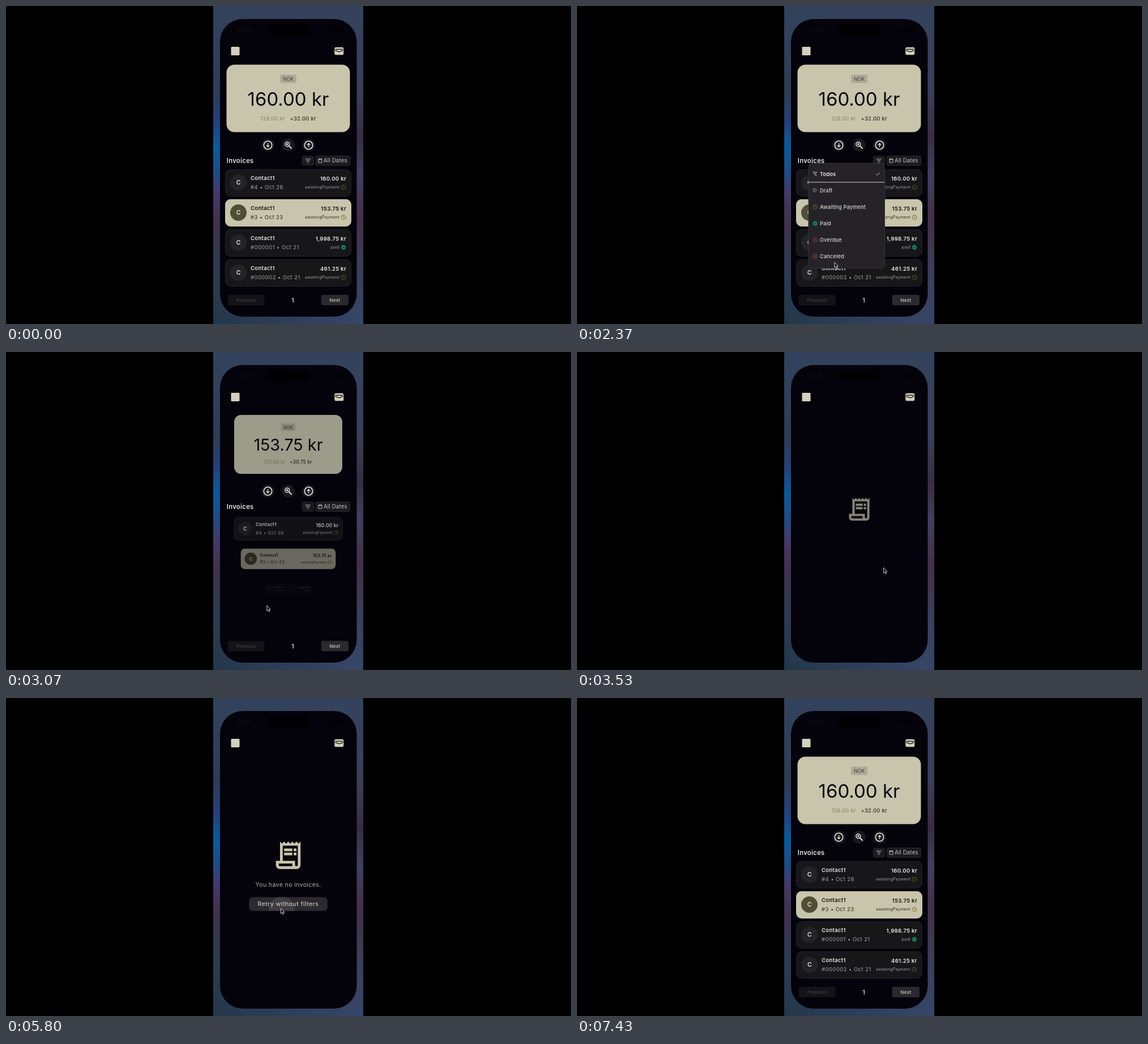
An HTML page for the animation above (7.83 s loop, 998 px wide and 561 px high).

```html
<!DOCTYPE html>
<html lang="en">
<head>
<meta charset="utf-8">
<title>Invoices</title>
<style>
  html, body { margin: 0; width: 100%; height: 100%; overflow: hidden; background: #000; }
  .wall { position: absolute; left: 366px; top: 0; width: 265px; height: 561px; }
  .left { background: linear-gradient(#34435d 0, #2d3d55 150px, #27407a 200px, #0a5c9c 250px, #1f4c86 295px,
    #453a6a 330px, #42324f 380px, #2f3b52 455px, #23384a 561px); }
  .right { background: linear-gradient(#34435d 0, #3d3f5a 150px, #3a2d40 230px, #42405f 295px, #44304a 375px,
    #3d3e59 455px, #37476a 561px); mask-image: linear-gradient(90deg, transparent, #000); }
  svg { position: absolute; left: 0; top: 0; width: 998px; height: 561px; }
  text { font-family: Inter, "Open Sans", sans-serif; white-space: pre; }
  .line { fill: none; stroke-linecap: round; stroke-linejoin: round; }
</style>
</head>
<body>
<div class="wall left"></div>
<div class="wall right"></div>
<svg id="stage" viewBox="0 0 998 561"></svg>
<script>
const LOOP = 7830, CX = 498.5;
const CREAM = '#c8c5ac', LIGHT = '#e9e8e4', PANEL = '#1b1a1f', EDGE = '#2a292e';

const text = (x, y, s, size, fill, { w = 400, ls = .3, at = 'start', id = '' } = {}) =>
  `<text ${id && `id="${id}"`} x="${x}" y="${y}" font-size="${size}" font-weight="${w}" fill="${fill}"
    letter-spacing="${ls}" text-anchor="${at}">${s}</text>`;
const box = (x, y, w, h, r, fill, stroke = 'none') =>
  `<rect x="${x}" y="${y}" width="${w}" height="${h}" rx="${r}" fill="${fill}" stroke="${stroke}"/>`;
const dot = (x, y, r, fill) => `<circle cx="${x}" cy="${y}" r="${r}" fill="${fill}"/>`;
const line = (d, color, w = 1) => `<path class="line" d="${d}" stroke="${color}" stroke-width="${w}"/>`;
const ring = (x, y, r, color, w = 1) =>
  `<circle class="line" cx="${x}" cy="${y}" r="${r}" stroke="${color}" stroke-width="${w}"/>`;
const group = (id, body) => `<g id="${id}">${body}</g>`;
const clock = (x, y, color) => ring(x, y, 3.8, color, .9) + line(`M${x} ${y - 2}v2.2l1.5 1`, color, .8);
const tick = (x, y, fill) => dot(x, y, 4.2, fill) + line(`M${x - 1.9} ${y}l1.4 1.4 2.5-2.6`, '#16151a', .9);

const balance = () =>
  box(389.5, 103.5, 218, 119, 14, CREAM) +
  box(484, 121, 29, 15, 3, '#adab97') +
  text(CX, 131.7, 'NOK', 8.6, '#3b3a34', { ls: .1, at: 'middle' }) +
  text(CX, 176, '160.00 kr', 33, '#06050d', { ls: 0, at: 'middle', id: 'total' }) +
  text(449.5, 201.5, '128.00 kr', 9.5, '#85836f', { ls: .2, id: 'net' }) +
  text(501.5, 201.5, '+32.00 kr', 9.5, '#32312b', { ls: .2, w: 500, id: 'tax' });

const invoices = [
  { ref: '#4 • Oct 28', sum: '160.00 kr' },
  { ref: '#3 • Oct 23', sum: '153.75 kr', marked: true },
  { ref: '#000001 • Oct 21', sum: '1,998.75 kr', paid: true },
  { ref: '#000002 • Oct 21', sum: '461.25 kr' },
];
const cardTop = i => 288 + 53 * i;

function card({ ref, sum, marked, paid }, i) {
  const y = cardTop(i);
  const main = marked ? '#17160f' : LIGHT;
  const sub = marked ? '#2b2a20' : '#a3a2a0';
  return box(387.5, y + .3, 222, 47.2, 9, marked ? CREAM : '#17171a', marked ? CREAM : '#232327') +
    dot(410.5, y + 23.5, 14.5, marked ? '#504e34' : '#242327') +
    text(410.6, y + 27.4, 'C', 10.5, marked ? '#eceada' : LIGHT, { w: 600, ls: 0, at: 'middle' }) +
    text(432, y + 18.8, 'Contact1', 9.5, main, { w: 600 }) +
    text(432, y + 35.3, ref, 9.5, sub, { ls: .45 }) +
    text(601, y + 20.3, sum, 9.6, main, { w: 600, at: 'end' }) +
    text(589, y + 34.4, paid ? 'paid' : 'awaitingPayment', 7, sub, { at: 'end' }) +
    (paid ? tick(596, y + 31.8, '#128060') : clock(596, y + 31.8, marked ? '#77691f' : '#6a611d'));
}

const toolbar = () =>
  [462.5, CX, 534.5].map(x => dot(x, 245.5, 11.3, PANEL)).join('') +
  [[462.5, 1], [534.5, -1]].map(([x, k]) => ring(x, 245.5, 7.2, LIGHT, 1.6) +
    line(`M${x} ${245.5 - 3 * k}V${245.5 + 3 * k}M${x - 2.3} ${245.5 + .8 * k}L${x} ${245.5 + 3 * k}L${x + 2.3} ${245.5 + .8 * k}`, LIGHT, 1.3)).join('') +
  ring(496.8, 243.8, 3.9, LIGHT, 1.5) + dot(496.8, 243.8, 1.7, LIGHT) + line('M500 247l4 4', LIGHT, 1.8) +
  text(389.7, 276.8, 'Invoices', 11.2, LIGHT, { w: 600, ls: .35 }) +
  box(523.5, 265, 20, 16, 3, PANEL, EDGE) +
  line('M529 270h8.4M530.5 272.9h5.4M532.2 275.8h2', '#c6c5bf', 1) +
  box(547, 264.5, 60.5, 16.8, 3, PANEL, EDGE) +
  line('M552.3 270h5.6v6.2h-5.6zM552.3 271h5.6M553.6 269v1M556.6 269v1', '#c6c5bf', .9) +
  text(561, 276.4, 'All Dates', 9.7, '#c6c5bf', { ls: .15 });

const pager = () =>
  box(391.5, 509.5, 65, 18.5, 3, '#131217') +
  text(424, 521.8, 'Previous', 8.1, '#4b4a4f', { ls: .25, at: 'middle' }) +
  text(506.7, 522.8, '1', 11, '#d2d0c2', { w: 600, ls: 0, at: 'middle' }) +
  box(556.8, 509.5, 48.2, 18.5, 3, '#2a292e') +
  text(581, 521.8, 'Next', 8.2, '#cfcdbf', { w: 500, ls: .25, at: 'middle' });

const GREEN = '#128060', RED = '#9c4545';
const strike = line('M417 293h7.4M418.6 296h4M420 299h1.4M417 292.5l7 7.5', '#c6c5bf', .9);
const pen = line('M417 322.7h5.5M417 325h4M417 327.3h2M420.3 328.3l3.8-3.8', '#a9a8a4', .9);
const entries = [
  strike + text(429, 299.6, 'Todos', 9.2, LIGHT, { w: 600, ls: .2 }) + line('M528.4 296.5l2 2 4.2-4.4', '#c6c5bf', 1),
  box(409, 310.4, 135, 1, 0, '#d3d2ce'),
  pen + text(429, 328.9, 'Draft', 9.2, '#d9d8d4', { w: 500, ls: .2 }),
  clock(420.7, 354.6, '#81761f') + text(429, 357.9, 'Awaiting Payment', 9.2, '#d9d8d4', { w: 500, ls: .15 }),
  tick(420.7, 383.6, GREEN) + text(429, 386.9, 'Paid', 9.2, '#d9d8d4', { w: 500, ls: .2 }),
  clock(420.7, 412.6, RED) + text(429, 415.9, 'Overdue', 9.2, '#d9d8d4', { w: 500, ls: .2 }),
  ring(420.7, 441.6, 3.8, RED) + line('M419.2 440.1l3 3m0-3l-3 3', RED) +
    text(429, 444.9, 'Canceled', 9.2, '#d9d8d4', { w: 500, ls: .2 }),
];

const receipt = `<path transform="translate(${CX} 277.5) scale(2.42) translate(-12 -12)" fill="${CREAM}" fill-rule="evenodd"
  d="M19.5 3.5 18 2l-1.5 1.5L15 2l-1.5 1.5L12 2l-1.5 1.5L9 2 7.5 3.5 6 2v14H3v3c0 1.7 1.3 3 3 3h12c1.7 0 3-1.3 3-3V2zM15 20H6c-.6 0-1-.4-1-1v-1h10zm4-1c0 .6-.4 1-1 1s-1-.4-1-1v-3H8V5h11zM9 7h6v2H9zm7 0h2v2h-2zM9 10h6v2H9zm7 0h2v2h-2z"/>`;

const frame =
  box(378, 23, 241.5, 525, 40, '#04020b') + box(461, 31, 76, 22, 11, '#010104') +
  text(421, 46, '20:05', 9, '#0f0e18', { w: 600, at: 'middle' }) +
  box(582, 39, 14, 7, 2, '#010104') + dot(572.5, 42.5, 3.4, '#010104') +
  box(397.5, 72, 15, 15, 1.5, '#d3d1bd') +
  box(580.3, 72.7, 16, 13.6, 2.8, '#d3d1bd') + line('M582 76.3h12.6M581.8 78.4l7 2.6 6-2.6', '#04020b', 1.3);

const clip = (id, shape) => `<clipPath id="${id}">${shape}</clipPath>`;
document.getElementById('stage').innerHTML =
  `<defs>${clip('menuClip', '<rect id="menuMask" rx="6"/>')}${clip('filterClip', box(523, 264.5, 21, 17, 3))}${clip('retryClip', box(429.3, 351.3, 138.5, 24.5, 7))}</defs>` +
  frame +
  group('list', toolbar() + pager() + group('balance', balance()) +
    invoices.map((v, i) => group('card' + i, card(v, i))).join('') +
    `<g clip-path="url(#filterClip)"><circle id="tapFilter" cx="530" cy="277" fill="#fff"/></g>`) +
  group('empty', group('icon', receipt) +
    group('note', text(CX, 332.8, 'You have no invoices.', 10.6, '#b3b2a6', { ls: .35, at: 'middle' })) +
    group('retry', box(429.3, 351.3, 138.5, 24.5, 7, '#2b2a2f') +
      `<g clip-path="url(#retryClip)"><circle id="tapRetry" cx="487" cy="373" fill="#fff"/></g>` +
      text(CX, 367.3, 'Retry without filters', 10.6, '#c5c3b4', { w: 500, ls: .4, at: 'middle' }))) +
  group('menu', '<rect id="menuBox" rx="6" fill="#252328" stroke="#37353a"/>' +
    `<g clip-path="url(#menuClip)"><circle id="tapMenu" cx="456.5" cy="453" fill="#fff"/>` +
    entries.map((e, i) => group('entry' + i, e)).join('') + '</g>') +
  `<path id="cursor" d="M0 0V9.3L2.1 7.5 3.7 10.9 5.2 10.2 3.7 7H6.5Z" fill="#0b0a10" stroke="#dcdcdc" stroke-width=".9" stroke-linejoin="round"/>`;

const $ = id => document.getElementById(id);
const clamp = v => Math.min(1, Math.max(0, v));
const easeOut = p => p <= 0 ? 0 : p >= 1 ? 1 : 1 - 2 ** (-10 * p);
const smooth = p => p * p * (3 - 2 * p);
const set = (id, attrs) => { for (const k in attrs) $(id).setAttribute(k, attrs[k]); };
const show = (id, on) => set(id, { visibility: on ? 'visible' : 'hidden' });

// Pops a group in around its centre: fast growth with a short linear fade.
function pop(id, cy, elapsed) {
  const s = easeOut(elapsed / 900);
  set(id, { transform: `translate(${CX} ${cy}) scale(${s}) translate(${-CX} ${-cy})`, opacity: clamp(elapsed / 345) });
}

function tap(id, t, start, end, r) {
  set(id, { r: r * smooth(clamp((t - start) / 150)), opacity: t < start ? 0 : .09 * clamp((end - t) / 200) });
}

const RELOAD = 2800, EMPTY = 3300, RETURN = 6340, GONE = 6300;
const path = [ // time, x, y
  [30, 629, 330], [770, 531, 278.5], [830, 531, 278.5], [900, 530, 277], [1380, 530, 277], [1840, 454, 449],
  [2200, 455, 452], [2980, 455, 452], [3560, 542, 380], [4260, 542, 380], [4340, 549, 379],
  [4680, 381, 13], [4800, 387, 40], [5200, 387, 40], [5630, 485.5, 371], [LOOP, 485.5, 371],
];

function moveCursor(t) {
  const i = Math.max(1, path.findIndex(p => p[0] > t));
  const [t0, x0, y0] = path[i - 1], [t1, x1, y1] = path[i];
  const p = smooth(clamp((t - t0) / (t1 - t0)));
  set('cursor', { transform: `translate(${x0 + (x1 - x0) * p} ${y0 + (y1 - y0) * p})` });
  show('cursor', t >= 30 && t < 6000);
}

function drawMenu(t) {
  const opening = clamp((t - 1132) / 300), closing = clamp(1.5 * (1 - (t - 2702) / 300));
  const p = Math.min(opening, closing), unit = 1 / (entries.length + 1.5);
  const w = 134.5 * clamp(p / unit), h = 185 * clamp(p / (unit * entries.length));
  const area = { x: 543.5 - w, y: 277.5, width: w, height: h };
  show('menu', p > 0);
  set('menu', { opacity: clamp(p * 3) });
  set('menuBox', area);
  set('menuMask', area);
  entries.forEach((_, i) => set('entry' + i, { opacity: clamp((p - (i + 1) * unit) / (1.5 * unit)) }));
}

function draw(t) {
  const listed = t < EMPTY || t >= GONE;
  show('list', listed);
  show('empty', !listed);

  const age = t < RELOAD ? LOOP : t < EMPTY ? t - RELOAD : t - RETURN;
  pop('balance', 163, age);
  [10, 90, 210, 335].forEach((delay, i) => pop('card' + i, cardTop(i) + 23.9, age - delay));
  const second = t >= RELOAD && t < EMPTY;
  $('total').textContent = second ? '153.75 kr' : '160.00 kr';
  $('net').textContent = second ? '123.00 kr' : '128.00 kr';
  $('tax').textContent = second ? '+30.75 kr' : '+32.00 kr';

  pop('icon', 277.5, t - EMPTY);
  pop('note', 329, t - EMPTY - 230);
  pop('retry', 363.5, t - EMPTY - 330);

  tap('tapFilter', t, 1070, 1560, 22);
  tap('tapMenu', t, 2380, 2780, 22.5);
  tap('tapRetry', t, 5660, 6100, 23);
  drawMenu(t);
  moveCursor(t);
}

const start = performance.now();
function tickFrame() {
  draw((performance.now() - start) % LOOP);
  requestAnimationFrame(tickFrame);
}
tickFrame();
</script>
</body>
</html>
```
